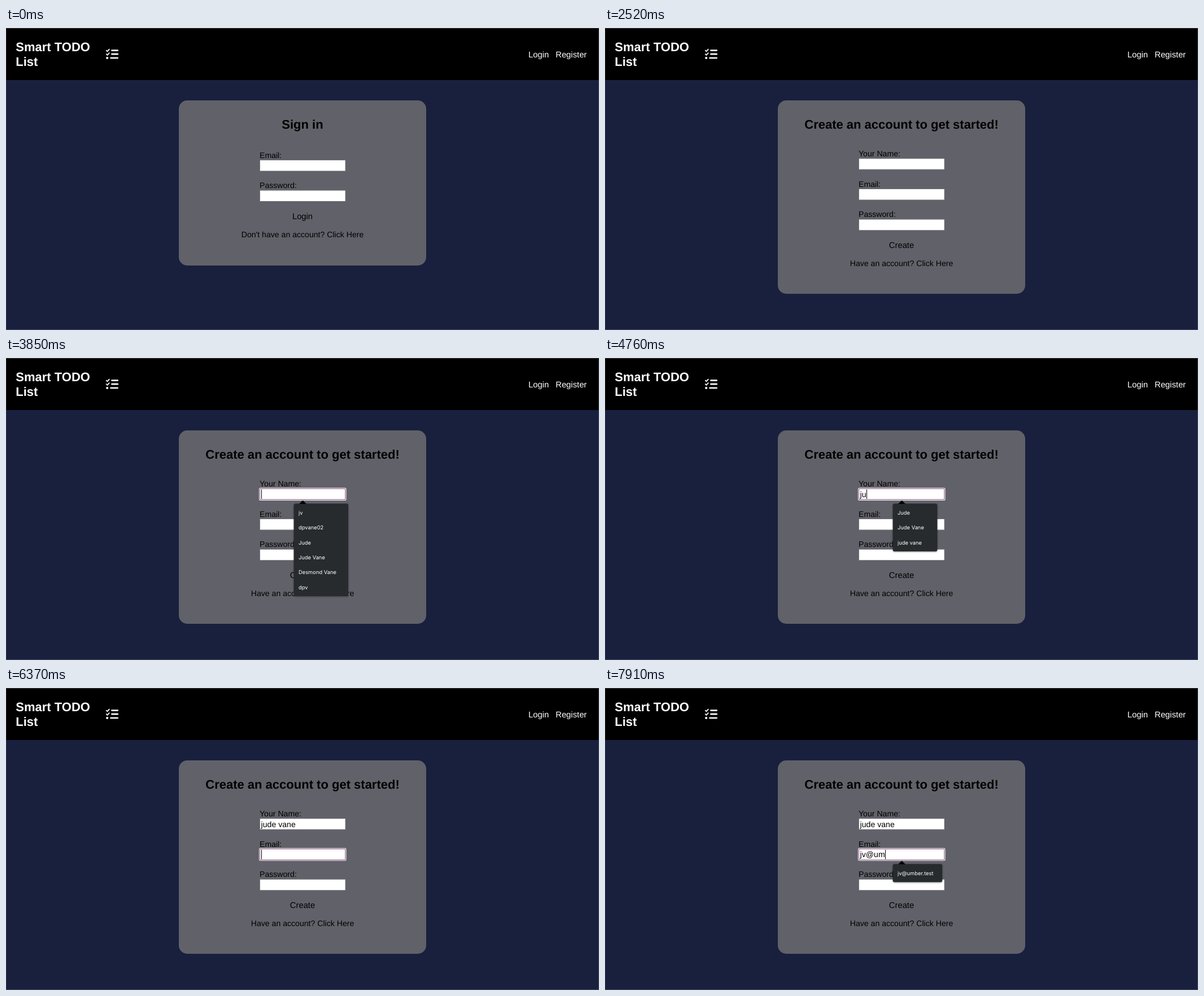
Recreate the animation shown at these times as an HTML page with a canvas. Size 1050 by 534 pixels, loop 8 s.

```html
<!DOCTYPE html>
<html lang="en">
<head>
<meta charset="utf-8">
<title>Smart TODO List</title>
<style>
  html, body { margin: 0; width: 100%; height: 100%; overflow: hidden; background: #18203e; }
  canvas { display: block; width: 1050px; height: 534px; }
</style>
</head>
<body>
<canvas id="stage"></canvas>
<script>
const W = 1050, H = 534, LOOP = 8000;
const SANS = '"Liberation Sans", Arial, sans-serif';
const UI = 'Inter, "Open Sans", sans-serif';
const BODY = `14.1px ${SANS}`;
const LINK = `14.8px ${SANS}`;
const TITLE = `bold 22px ${SANS}`;

const canvas = document.getElementById('stage');
const ctx = canvas.getContext('2d');
const dpr = window.devicePixelRatio || 1;
canvas.width = W * dpr;
canvas.height = H * dpr;
ctx.scale(dpr, dpr);
ctx.textRendering = 'geometricPrecision';

const REGISTER = 2520, FOCUS_NAME = 3500, SUGGEST_NAME = 3850;
const FOCUS_EMAIL = 6370, SUGGEST_EMAIL = 7000;
const CARET_OFF = 4340;

const name = {
  text: 'jude vane',
  keys: [4620, 4760, 4900, 5110, 5390, 5530, 5670, 5810, 6020],
  known: ['jv', 'dpvane02', 'Jude', 'Jude Vane', 'Desmond Vane', 'dpv', 'jude vane']
};
const email = {
  text: 'jv@umber.test',
  keys: [6930, 7140, 7490, 7700, 7910],
  known: ['jv@umber.test']
};

const typed = (field, t) => field.text.slice(0, field.keys.filter(k => t >= k).length);

function label(str, x, y, font, color = '#000', align = 'left') {
  ctx.font = font;
  ctx.fillStyle = color;
  ctx.textAlign = align;
  ctx.fillText(str, x, y);
}

function box(x, y, w, h, r, color) {
  ctx.fillStyle = color;
  ctx.beginPath();
  ctx.roundRect(x, y, w, h, r);
  ctx.fill();
}

function line(points, width) {
  ctx.lineWidth = width;
  ctx.beginPath();
  points.forEach(([x, y]) => ctx.lineTo(x, y));
  ctx.stroke();
}

function header() {
  box(0, 0, W, 92, 0, '#000');
  label('Smart TODO', 17.3, 41.3, TITLE, '#fff');
  label('List', 17.3, 66.5, TITLE, '#fff');
  label('Login', 925, 51.7, LINK, '#fff');
  label('Register', 973.2, 51.7, LINK, '#fff');

  ctx.strokeStyle = '#fff';
  ctx.lineCap = ctx.lineJoin = 'round';
  [[187.5, 39.6], [187.5, 46.2], [185.5, 53]].forEach(([x, y]) => line([[x, y], [197.7, y]], 2.7));
  [39.6, 46.2].forEach(y => line([[177.8, y], [179.5, y + 1.8], [182.8, y - 2]], 1.8));
  ctx.fillStyle = '#fff';
  ctx.beginPath();
  ctx.arc(179.2, 53, 2.1, 0, 7);
  ctx.fill();
}

function input(caption, y, value = '', focused = false, caret = false) {
  label(caption, 449, y - 3.4, BODY);
  if (focused) {
    box(448, y - 1, 154.5, 22.5, 2.5, '#fff');
    box(449, y, 152.4, 20.4, 1.5, '#79426f');
    box(450, y + 1, 150.4, 18.4, 0.5, '#fff');
  } else {
    box(449, y, 152.3, 20.3, 0, '#77777c');
    box(450, y + 0.9, 150.6, 18.5, 0, '#fff');
  }
  label(value, 451.6, y + 15.2, BODY);
  if (caret) {
    const x = Math.round(451.6 + ctx.measureText(value).width);
    box(x, y + 2, 1, 16.6, 0, '#000');
  }
}

function suggestions(items, y, w) {
  const x = 509.6, row = 26.3;
  ctx.save();
  ctx.shadowColor = 'rgba(0,0,0,.4)';
  ctx.shadowBlur = 3 * dpr;
  ctx.shadowOffsetY = dpr;
  box(x, y, w, items.length * row + 5.7, 3, '#272b2e');
  ctx.restore();
  ctx.beginPath();
  ctx.moveTo(519, y + 0.5);
  ctx.lineTo(525.5, y - 5.7);
  ctx.lineTo(532, y + 0.5);
  ctx.fill();
  items.forEach((s, i) => label(s, 518, y + 19.5 + i * row, `9.35px ${UI}`, '#fff'));
}

function signIn() {
  box(306, 128, 438, 292, 15, '#616169');
  label('Sign in', 525, 178, TITLE, '#000', 'center');
  input('Email:', 233);
  input('Password:', 286.7);
  label('Login', 525, 338, LINK, '#000', 'center');
  label("Don't have an account? Click Here", 525, 369.7, BODY, '#000', 'center');
}

function register(t) {
  const onName = t >= FOCUS_NAME && t < FOCUS_EMAIL;
  const onEmail = t >= FOCUS_EMAIL;
  const blink = t >= CARET_OFF && t < name.keys[0];
  const who = typed(name, t), mail = typed(email, t);

  box(306, 128, 438, 342, 15, '#616169');
  label('Create an account to get started!', 525, 178, TITLE, '#000', 'center');
  input('Your Name:', 230.4, who, onName, onName && !blink);
  input('Email:', 284.1, mail, onEmail, onEmail);
  input('Password:', 337.8);
  label('Create', 525, 389, LINK, '#000', 'center');
  label('Have an account? Click Here', 525, 420.5, BODY, '#000', 'center');

  if (onName && t >= SUGGEST_NAME) {
    const items = name.known.filter(s => s.toLowerCase().startsWith(who)).slice(0, 6);
    suggestions(items, 257.5, who ? 78.8 : 96.4);
  }
  if (t >= SUGGEST_EMAIL) suggestions(email.known, 311.3, 87.6);
}

function draw(t) {
  box(0, 0, W, H, 0, '#18203e');
  header();
  if (t < REGISTER) signIn();
  else register(t);
  ctx.strokeStyle = 'rgba(120,120,125,.5)';
  ctx.lineWidth = 1;
  ctx.strokeRect(0.5, 0.5, W - 1, H - 1);
}

const start = performance.now();
function tick() {
  draw((performance.now() - start) % LOOP);
  requestAnimationFrame(tick);
}
tick();
</script>
</body>
</html>
```
